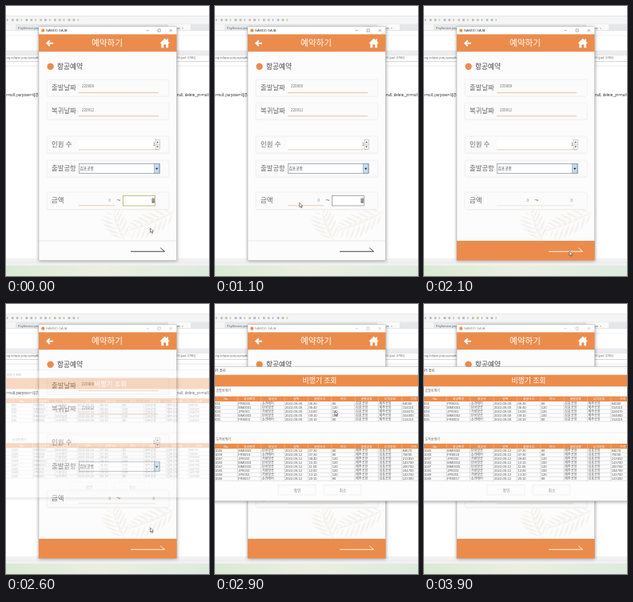
Write an HTML page that moves like this. It is 254 by 338 pixels and loops after 4 s.

```html
<!DOCTYPE html>
<html lang="ko">
<head>
<meta charset="utf-8">
<style>
html, body { margin: 0; width: 100%; height: 100%; overflow: hidden; background: #fff; }
svg { display: block; width: 100vw; height: 100vh; }
text { font-family: "Liberation Sans", "Noto Sans CJK KR", sans-serif; white-space: pre; }
.ko { font-family: "Noto Sans CJK KR Light", "Noto Sans CJK KR", "Noto Sans CJK", sans-serif; font-weight: 300; }
</style>
</head>
<body>
<svg id="stage" viewBox="0 0 254 338" preserveAspectRatio="none"></svg>
<script>
const ORANGE = '#eb8c4c';
const stage = document.getElementById('stage');

const rect = (x, y, w, h, fill, extra = '') =>
  `<rect x="${x}" y="${y}" width="${w}" height="${h}" fill="${fill}" ${extra}/>`;
const path = (d, stroke, w = 0.7, extra = '') =>
  `<path d="${d}" fill="none" stroke="${stroke}" stroke-width="${w}" ${extra}/>`;
const line = (x1, y1, x2, y2, color, w) => path(`M${x1} ${y1}L${x2} ${y2}`, color, w);
const text = (x, y, size, s, fill = '#444', extra = '') =>
  `<text x="${x}" y="${y}" font-size="${size}" fill="${fill}" ${extra}>${s}</text>`;
const ko = (x, y, size, s, fill, extra = '') => text(x, y, size, s, fill, 'class="ko" ' + extra);
const MID = 'text-anchor="middle"';
const END = 'text-anchor="end"';

function desktop() {
  let s = rect(0, 0, 254, 338, '#fff') + rect(0, 12, 254, 11, '#f5f5f5');
  s += line(0, 12.5, 254, 12.5, '#ddd', 0.6);
  const tones = ['#a3b4c8', '#b9b9b9', '#b0c0ac', '#cfc0a2'];
  for (let i = 0; i < 16; i++)
    s += rect(1 + i * 5.9, 16.2, i % 3 ? 2.6 : 1.4, 2.6, tones[i % 4]);
  s += rect(0, 22.5, 254, 8, '#e6e7ea') + rect(0, 23, 12, 7.5, '#f6f6f6') + rect(203, 23, 28, 7.5, '#fafafa');
  s += text(15, 28.6, 3.8, 'PayService.java', '#666') + text(205, 28.6, 3.8, 'ew.java  ×', '#666');
  s += line(0, 30.5, 254, 30.5, '#d2d2d2', 0.5) + line(0, 37, 254, 37, '#eee', 0.8);
  s += rect(0, 55.5, 254, 6, '#ececee') + line(0, 61.5, 254, 61.5, '#d8d8d8', 0.5);
  s += text(41, 65.9, 3.9, 'ers\\org.eclipse.justj.openjdk', '#666', END);
  s += text(213, 65.9, 3.9, '23 [pid: 3780]', '#666');
  s += line(0, 69.5, 254, 69.5, '#c4c4c4', 0.7) + line(0, 75, 254, 75, '#ddd', 0.6);
  s += text(41, 112.6, 4.6, 's=null, purpose=제주', '#333', END);
  s += text(214, 112.6, 4.6, 'null, delete_yn=null', '#333');
  s += rect(0, 316, 254, 9.5, '#f1f1f1') + line(0, 321, 254, 321, '#ddd', 0.5);
  s += rect(0, 325, 254, 13, 'url(#bar)');
  return s;
}

// A curved stem with paired leaflets that shrink toward the tip.
function frond(x, y, angle, len, count) {
  let d = `M0 0Q${len / 2} -7 ${len} 0`;
  for (let i = 1; i <= count; i++) {
    const u = i / (count + 1), px = len * u, py = -14 * u * (1 - u);
    const reach = 21 * Math.sin(Math.PI * (0.2 + 0.75 * u));
    for (const side of [-1, 1]) {
      const ex = px + reach * 0.7, ey = py + side * reach * 0.75;
      d += `M${px} ${py}Q${px + reach * 0.25} ${py + side * reach * 0.55} ${ex} ${ey}`;
      d += `Q${px + reach * 0.45} ${py + side * reach * 0.33} ${px} ${py}`;
    }
  }
  return `<path d="${d}" transform="translate(${x} ${y}) rotate(${angle})" fill="#f4f2ed"/>`;
}

function field(y, h, label) {
  return rect(51, y, 153, h, '#fbfbfb', 'rx="1.5" stroke="#ececec" stroke-width=".8"') +
    line(52, y + h + 0.7, 203, y + h + 0.7, '#f1f1f1', 0.8) +
    ko(57, y + h / 2 + 2.5, 8.4, label, '#686868');
}

function form() {
  let s = rect(41, 27, 173, 292, '#000', 'opacity=".4" filter="url(#soft)"');
  s += rect(41, 26, 172.5, 292.5, '#fcfcfc', 'stroke="#b4b4b4" stroke-width=".5"');
  s += rect(41.3, 26.3, 172, 9.2, '#fff') + `<circle cx="46.3" cy="30.7" r="2.1" fill="${ORANGE}"/>`;
  s += '<g id="caption">' + text(50, 32.2, 4, 'NAMDO GAJA', '#333') +
    path('M175.5 30.7h3.4M190 29h3.2v3.2h-3.2zM204.6 29l3.3 3.3M207.9 29l-3.3 3.3', '#555', 0.45) + '</g>';
  s += rect(41, 35.4, 172.5, 21.8, ORANGE);
  s += path('M59 46.6H52M54.8 43.2L51.3 46.6L54.8 50', '#fff', 1.9);
  s += '<path d="M198.7 40.5L192.4 46.8H194.3V52.3H197.2V48.2H200.2V52.3H203.1V46.8H205L202.9 44.7V41.3H201.3V43.1Z" fill="#fff"/>';
  s += ko(126.5, 49.5, 10.6, '예약하기', '#fff', MID);
  s += `<g clip-path="url(#body)">${frond(214, 256, 158, 72, 9)}${frond(150, 296, -112, 44, 6)}</g>`;
  s += `<circle cx="55.6" cy="75.8" r="4.2" fill="${ORANGE}"/>`;
  s += ko(64, 79, 8.7, '항공예약', '#444');

  s += field(92, 21, '출발날짜') + field(121, 21, '복귀날짜') + field(163, 21, '인원 수');
  s += field(193, 21, '출발공항') + field(233, 21.5, '금액');
  s += text(95, 102.4, 4.5, '220909', '#777') + text(95, 131.6, 4.5, '220912', '#777');
  for (const y of [108.6, 137.8, 179.8]) s += line(91, y, 191, y, '#e6b08c', 0.8);
  s += rect(91, 167.5, 95, 11.8, '#fff') + text(186.6, 175.2, 4.6, '1', '#555', END);
  s += rect(187, 167.2, 5.3, 12.4, '#f6f6f6', 'stroke="#aaa" stroke-width=".5"') + line(187, 173.4, 192.3, 173.4, '#aaa', 0.5);
  s += '<path d="M188.4 171.2h2.5l-1.25-1.6zM188.4 175.6h2.5l-1.25 1.6z" fill="#444"/>';
  s += rect(91.5, 197.5, 101, 12, '#fff', 'stroke="#8c959e" stroke-width=".7"');
  s += rect(185.5, 197.8, 6.3, 11.4, '#c5dcef', 'stroke="#6689a8" stroke-width=".5"');
  s += '<path d="M187 202.8h3.4l-1.7 2.2z" fill="#222"/>';
  s += text(92.5, 205.2, 4.7, '김포공항', '#444');
  s += text(131, 245, 4.6, '0', '#888', END) + text(141, 246.3, 9, '~', '#777', MID);
  s += '<g id="idle">' + line(91, 249.8, 187, 249.8, '#ead0bf', 0.6) + text(186, 245, 4.6, '0', '#888', END) + '</g>';
  s += '<g id="focus">' + line(91, 249.8, 136, 249.8, '#e4c2aa', 0.8) +
    '<rect id="frame" x="146.5" y="237.5" width="40" height="12.5" fill="#fff" stroke-width=".8"/>' +
    rect(182.6, 240.6, 3, 5.8, '#555') + text(185.4, 245.2, 4.6, '0', '#fff', END) + '</g>';
  s += line(41, 294, 213.5, 294, '#d9d9d9', 0.6);
  s += '<rect id="foot" x="41" y="294" width="172.7" height="24.6"/>';
  s += '<path id="arrow" d="M156 307.3H198.5L193.3 302.8" fill="none" stroke-width=".9"/>';
  return s;
}

const HEADS = ['No', '항공편명', '항공사', '날짜', '출발시간', '좌석', '출발공항', '도착공항', '가격'];
const AIR = { PR: '소라에어', MM: '단비항공', JP: '가람항공', FR: '소라에어' };
const OUT = ['031 PR0001 06:30 80 64000', '032 MM0001 06:40 120 154110', '033 JP0001 14:00 120 224670',
  '035 MM0002 09:10 100 164000', '035 FR0002 20:10 80 154110'];
const BACK = ['1045 MM0002 07:30 80 84670', '1039 FR0018 07:30 80 70690', '1037 JP0032 08:40 120 213950',
  '1043 MM0010 10:10 100 143700', '1047 MM0035 11:00 120 200700', '1045 JP0033 12:00 100 184700',
  '1049 JP0055 13:10 120 143700', '1046 FR0037 20:10 80 123300'];
const colX = i => -1 + i * 29.35;

function table(y, rows, date, from, to) {
  const step = 5, top = y + 6.4, bottom = top + rows.length * step, right = colX(9);
  let s = rect(-12, y, right + 12, 6.4, ORANGE);
  HEADS.forEach((h, i) => { s += text(colX(i) + 14.6, y + 4.7, 3.8, h, '#fff', MID); });
  rows.forEach((row, r) => {
    const [no, code, time, seats, price] = row.split(' ');
    const cells = [no, code, AIR[code.slice(0, 2)], date, time, seats, from, to, price];
    const base = top + r * step + 3.9;
    cells.forEach((c, i) => { s += text(colX(i) + 1, base, 4.1, c, '#555'); });
    s += line(-12, top + (r + 1) * step, right, top + (r + 1) * step, '#b9b9b9', 0.4);
  });
  for (let i = 1; i < 10; i++) {
    s += line(colX(i), y, colX(i), top, '#f5d2ba', 0.4) + line(colX(i), top, colX(i), bottom, '#aaa', 0.4);
  }
  return s;
}

function dialog() {
  let s = rect(-12, 80, 282, 168, '#000', 'opacity=".35" filter="url(#soft)"');
  s += rect(-12, 78.7, 282, 168, '#fdfdfd', 'stroke="#b4b4b4" stroke-width=".5"');
  s += rect(-12, 79, 282, 9.8, '#fff') + text(13, 85.4, 4, '비행기 조회', '#333', END);
  s += rect(-12, 88.7, 282, 14.6, ORANGE) + ko(131, 99.2, 8.8, '비행기 조회', '#fff', MID);
  s += text(20, 110, 4.1, '출발비행기', '#666', END);
  s += table(115.6, OUT, '2022-09-09', '김포공항', '제주공항');
  s += line(-12, 161, 270, 161, '#e4e4e4', 0.6);
  s += text(20, 171.2, 4.1, '도착비행기', '#666', END);
  s += table(174.8, BACK, '2022-09-12', '제주공항', '김포공항');
  for (const [x, label] of [[79, '확인'], [136, '취소']])
    s += rect(x, 226.5, 47, 12.5, '#fcfcfc', 'stroke="#ececec" stroke-width=".6"') +
      ko(x + 24, 234.8, 4.8, label, '#888', MID);
  return s;
}

stage.innerHTML = `<defs>
<linearGradient id="bar"><stop offset="0" stop-color="#d9ead3"/><stop offset=".45" stop-color="#eceee0"/><stop offset="1" stop-color="#dcebdd"/></linearGradient>
<filter id="soft"><feGaussianBlur stdDeviation="2"/></filter>
<clipPath id="body"><rect x="41.5" y="248" width="171.8" height="46"/></clipPath></defs>
${desktop()}${form()}<g id="dialog">${dialog()}</g>
<path id="cursor" d="M0 0V5.6L1.3 4.4L2.2 6.5L3.1 6.1L2.2 4.1H4Z" fill="#fff" stroke="#333" stroke-width=".55"/>`;

const el = id => document.getElementById(id);
const [caption, idle, focus, frame, foot, arrow, popup, cursor] =
  ['caption', 'idle', 'focus', 'frame', 'foot', 'arrow', 'dialog', 'cursor'].map(el);

// time, x, y
const TRACK = [[0, 180.5, 278], [100, 180.5, 278], [700, 79, 225], [900, 79, 225], [1500, 182, 307],
  [2300, 182, 307], [2600, 180.5, 280], [2900, 150, 134], [3100, 150, 134], [3600, 262, 150], [4000, 262, 150]];

function cursorAt(t) {
  const i = TRACK.findIndex((p, n) => n && t <= p[0]);
  const [t0, x0, y0] = TRACK[i - 1], [t1, x1, y1] = TRACK[i];
  const u = (t - t0) / (t1 - t0), e = u * u * (3 - 2 * u);
  return [x0 + (x1 - x0) * e, y0 + (y1 - y0) * e];
}

function draw(ms) {
  const t = Math.floor((ms % 4000) / 100) * 100;
  const [x, y] = cursorAt(t);
  cursor.setAttribute('transform', `translate(${x} ${y})`);

  const hot = t > 1000 && (y > 294 || t > 1500);
  foot.setAttribute('fill', hot ? ORANGE : 'none');
  arrow.setAttribute('stroke', hot ? '#fff' : '#333');

  const typing = t < 2000;
  focus.style.display = typing ? '' : 'none';
  idle.style.display = typing ? 'none' : '';
  frame.setAttribute('stroke', t < 400 ? '#adb267' : '#999');

  const open = Math.max(0, Math.min(1, (t - 2500) / 300));
  const scale = 0.92 + 0.08 * open;
  popup.style.display = open ? '' : 'none';
  popup.setAttribute('opacity', open);
  popup.setAttribute('transform', `translate(127 163) scale(${scale}) translate(-127 -163)`);
  caption.setAttribute('opacity', open ? 0.55 : 1);
}

const start = performance.now();
function tick() {
  draw(performance.now() - start);
  requestAnimationFrame(tick);
}
tick();
</script>
</body>
</html>
```
